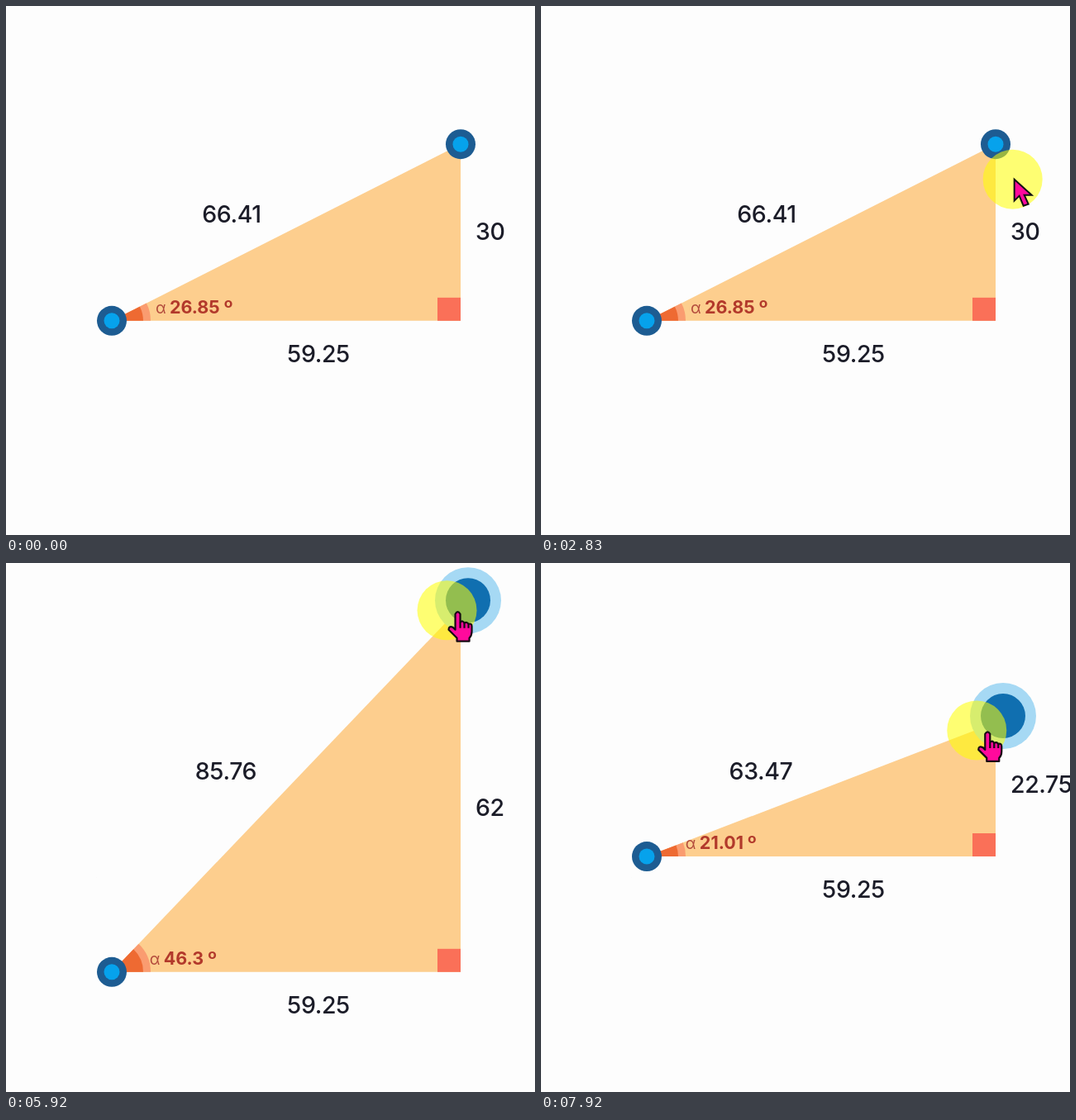
Recreate the animation shown at these times as an HTML page. Size 640x640 px, loop 8 s.

```html
<!DOCTYPE html>
<html lang="en">
<head>
<meta charset="utf-8">
<title>Right triangle</title>
<style>
  html, body { margin: 0; width: 100%; height: 100%; overflow: hidden; background: #fdfdfd; }
  svg { display: block; width: 100vw; height: 100vh; }
  text { font-family: Inter, "Open Sans", sans-serif; fill: #1b1c28; white-space: pre; }
  .side { font-size: 28.5px; font-weight: 500; letter-spacing: -0.4px; }
  .mid { text-anchor: middle; }
  .angle { font-size: 21.5px; font-weight: 700; fill: #b2392b; }
  .alpha { font-size: 19px; fill: #b2493b; }
</style>
</head>
<body>
<svg viewBox="0 0 640 640">
  <polygon id="tri" fill="#fdce8e"/>
  <path id="arcOuter" fill="#fa9c70"/>
  <path id="arcInner" fill="#ee6a32"/>
  <rect id="corner" x="522" width="28" height="28" fill="#fa7058"/>
  <text id="hyp" class="side mid" y="262"></text>
  <text id="base" class="side mid" x="378"></text>
  <text id="height" class="side" x="568"></text>
  <text id="alpha" class="alpha">α</text>
  <text id="angle" class="angle"></text>
  <g id="leftKnob"><circle r="18" fill="#1d5c92"/><circle r="9.5" fill="#06a2ec"/></g>
  <g id="rightKnob"><circle r="18" fill="#1d5c92"/><circle r="9.5" fill="#06a2ec"/></g>
  <g id="grip"><circle r="40" fill="#a6d9f4"/><circle r="27" fill="#106fb0"/></g>
  <circle id="glow" r="36" fill="#ff0" fill-opacity=".55"/>
  <circle id="ripple" fill="none" stroke="#62b389" stroke-width="2.5" stroke-opacity=".7"/>
  <path id="arrow" d="M0 0V26L6 20L11 32L17 30L12 19H21Z" fill="#ff0a9c" stroke="#111" stroke-width="2"/>
  <g id="hand" stroke="#160a12" stroke-width="2.2" stroke-linejoin="round">
    <path fill="#ff0a9c" d="M-3 3Q0-2 3 3V13Q6 10 8 14Q11 12 13 15Q17 14 17 18V24Q17 29 14 32V36H-1V32L-11 22Q-11 17-6 19L-3 22Z"/>
    <path d="M3 13V20M8 14V20M13 15V20"/>
  </g>
</svg>
<script>
const LOOP = 8000, STEP = 1000 / 12;
const LEFT = 128, RIGHT = 550, MID_Y = 274, BASE = 59.25, REST = 30;
const SCALE = (RIGHT - LEFT) / BASE;
const ENTER = 1500, POINT = 1750, NEAR = 2830, HOVER = 3000, SETTLE = 3330;
const PRESS = 4330, DRAG = 4500, RIPPLE_END = 4660;
const LEAD = 60;

const el = {};
document.querySelectorAll("[id]").forEach(n => el[n.id] = n);

function set(node, attrs) {
  for (const k in attrs) node.setAttribute(k, attrs[k]);
}
function place(node, x, y) {
  node.setAttribute("transform", `translate(${x} ${y})`);
}
function show(node, on) {
  node.style.display = on ? "" : "none";
}

const easeOut = power => p => 1 - (1 - p) ** power;
const smooth = p => p * p * (3 - 2 * p);

function tween(t, t0, t1, from, to, ease = p => p) {
  const p = Math.min(1, Math.max(0, (t - t0) / (t1 - t0)));
  return from + (to - from) * ease(p);
}

// pull up, sink a little, then drop
function heightAt(t) {
  if (t < 6250) return tween(t, DRAG, 5700, REST, 62, easeOut(1.3));
  if (t < 7080) return tween(t, 6250, 7080, 62, 57, easeOut(1.75));
  return tween(t, 7080, 8080, 57, 20.13, smooth);
}
const topOf = h => MID_Y - h * SCALE / 2;

function pointerAt(t) {
  const move = (t0, t1, a, b, ease) => a.map((v, i) => tween(t, t0, t1, v, b[i], ease));
  const point = [465, 492], near = [571, 210], held = [537, 174];
  if (t < POINT) return move(ENTER, POINT, [440, 720], point);
  if (t < NEAR) return move(POINT, NEAR, point, near, easeOut(1.5));
  if (t <= DRAG + 1) return move(NEAR, SETTLE, near, held, easeOut(1.5));
  return [tween(t, DRAG, LOOP, 538, 527), topOf(heightAt(t + LEAD)) + 4];
}

const format = v => String(+v.toFixed(2));

// label width from digit, narrow one and point widths
function labelWidth(s, digit, one, point) {
  return [...s].reduce((w, c) => w + (c === "." ? point : c === "1" ? one : digit), 0);
}

function sector(r, angle, y) {
  const x2 = LEFT + r * Math.cos(angle), y2 = y - r * Math.sin(angle);
  return `M${LEFT} ${y}H${LEFT + r}A${r} ${r} 0 0 0 ${x2} ${y2}Z`;
}

function drawTriangle(h) {
  const top = topOf(h), bottom = 2 * MID_Y - top;
  const angle = Math.atan2(h, BASE);
  set(el.tri, { points: `${LEFT},${bottom} ${RIGHT},${bottom} ${RIGHT},${top}` });
  set(el.arcOuter, { d: sector(47, angle, bottom) });
  set(el.arcInner, { d: sector(38, angle, bottom) });
  set(el.corner, { y: bottom - 28 });

  const hyp = format(Math.hypot(h, BASE));
  el.hyp.textContent = hyp;
  set(el.hyp, { x: (LEFT + RIGHT) / 2 - labelWidth(hyp, 16.5, 9.5, 7) });
  el.base.textContent = format(BASE);
  set(el.base, { y: bottom + 50 });
  el.height.textContent = format(h);
  set(el.height, { y: 283 + (h - REST) * 0.72 });

  const deg = format(angle * 180 / Math.PI);
  const x = 149 + labelWidth(deg, 14.6, 8.5, 5.5) / 2, y = bottom - 9;
  el.angle.textContent = deg + " º";
  set(el.alpha, { x, y });
  set(el.angle, { x: x + 17, y });

  place(el.leftKnob, LEFT, bottom);
  place(el.rightKnob, RIGHT, top);
  place(el.grip, RIGHT + 9, top - 8);
}

function drawPointer(t) {
  const [x, y] = pointerAt(t);
  const inside = t >= ENTER, hover = t >= HOVER;
  set(el.glow, { cx: x, cy: y });
  place(el.arrow, x + 2, y);
  place(el.hand, x + 13, y + 1.5);
  show(el.glow, inside);
  show(el.arrow, inside && !hover);
  show(el.hand, hover);
  show(el.grip, hover);
  show(el.rightKnob, !hover);

  show(el.ripple, t >= PRESS && t < RIPPLE_END);
  set(el.ripple, { cx: RIGHT, cy: 171, r: tween(t, PRESS, RIPPLE_END, 18, 41) });
}

function render(now) {
  const t = Math.floor((now % LOOP + 5) / STEP) * STEP;
  drawTriangle(Math.round(heightAt(t) * 4) / 4);
  drawPointer(t);
}

let start;
function tick(now) {
  start ??= now;
  render(now - start);
  requestAnimationFrame(tick);
}
render(0);
requestAnimationFrame(tick);
</script>
</body>
</html>
```
